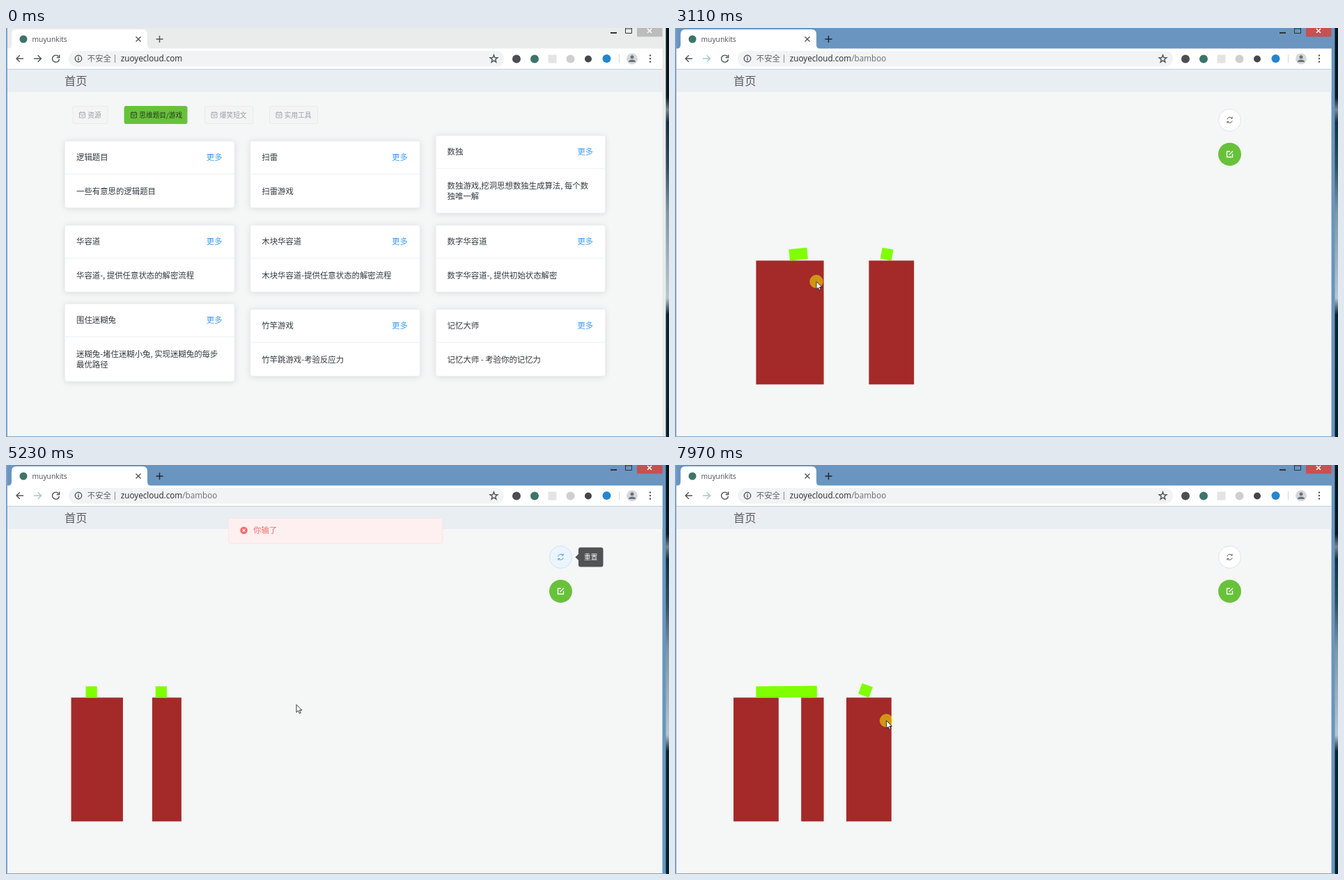
An HTML page for the animation above (8 s loop, 952x588 px).

```html
<!DOCTYPE html>
<html lang="zh">
<head>
<meta charset="utf-8">
<title>muyunkits</title>
<style>
html, body { margin: 0; width: 100%; height: 100%; overflow: hidden; background: #f5f5f5; }
svg { display: block; position: absolute; left: 0; top: 0; }
text { font-family: "Noto Sans CJK SC", "Noto Sans CJK", "Noto Sans", sans-serif; white-space: pre; }
.latin { font-family: "Open Sans", "Noto Sans", sans-serif; }
.card { fill: #fff; stroke: #ebeef5; stroke-width: .8; filter: drop-shadow(0 1.6px 4.5px rgba(0,0,0,.11)); }
.line { fill: none; stroke: #50555a; stroke-width: 1.4; }
</style>
</head>
<body>
<svg id="stage" width="952" height="588" viewBox="0 0 952 588">
  <defs>
    <linearGradient id="wall" x2="0" y2="1">
      <stop offset="0" stop-color="#04141d"/><stop offset=".17" stop-color="#0a1a24"/>
      <stop offset=".2" stop-color="#77858c"/><stop offset=".23" stop-color="#12303e"/>
      <stop offset=".34" stop-color="#2f4f60"/><stop offset=".45" stop-color="#7d97a5"/>
      <stop offset=".66" stop-color="#b6c6ce"/><stop offset=".7" stop-color="#0c2431"/>
      <stop offset="1" stop-color="#06202c"/>
    </linearGradient>
  </defs>
  <rect id="frame" width="948" height="588"/>
  <rect x="947.5" width="4.5" height="588" fill="url(#wall)"/>
  <rect id="leftEdge" width="2" height="588" fill="#7ba3c8"/>
  <rect x="2" y="30" width="940.5" height="557" fill="#f5f6f6"/>
  <rect y="587" width="948" height="1" fill="#7ba3c8"/>

  <g id="chrome">
    <path d="M2 30Q8 30 8 24V9Q8 2 15 2H196Q203 2 203 9V24Q203 30 209 30Z" fill="#fff"/>
    <rect x="2" y="29.5" width="940.5" height="29.5" fill="#fff"/>
    <rect x="2" y="58.8" width="940.5" height="1.2" fill="#c5d2de"/>
    <circle cx="25" cy="16" r="5.5" fill="#3d7568"/>
    <text class="latin" x="37.5" y="20" font-size="10.3" fill="#4b4f54">muyunkits</text>
    <path class="line" d="M186.5 12.5l7 7m0-7l-7 7"/>
    <path class="line" id="plus" d="M215.5 16h10m-5-5v10" stroke-width="1.7"/>
    <rect id="close" x="906" width="36.5" height="12.5"/>
    <path d="M921 1l6 6m0-6l-6 6" stroke="#fff" stroke-width="1.6"/>
    <path d="M868 7h9" stroke="#333" stroke-width="2"/>
    <path d="M889.5 0v7.5h9V0M889 1h10" stroke="#333" fill="none"/>
    <path class="line" d="M25 44H15m4.800-4.800L15 44l4.800 4.800"/>
    <path class="line" id="forward" d="M40 44h10.500m-4.800-4.800L50.500 44l-4.800 4.800"/>
    <path class="line" d="M75.500 41A5 5 0 1 0 76.500 45M76.700 38.500v4h-4"/>
    <rect x="90" y="33" width="625" height="22.500" rx="11.200" fill="#f1f3f4"/>
    <circle class="line" cx="104" cy="44" r="4.700" stroke-width="1.200"/>
    <path class="line" d="M104 43.300v3.400m0-5.400v1.100"/>
    <text x="116.800" y="48.200" font-size="11.400" fill="#5f6368">不安全</text>
    <path d="M156.500 38.500v11.500" stroke="#888c90"/>
    <text class="latin" x="164.800" y="48.200" font-size="11.700" fill="#26292d">zuoyecloud.com<tspan id="path" fill="#6b7075">/bamboo</tspan></text>
    <path class="line" id="star" stroke-width="1.100"/>
    <circle cx="733" cy="44.500" r="6" fill="#4b4e52"/>
    <circle cx="759" cy="44.500" r="6" fill="#3d7568"/>
    <rect x="778.500" y="38.500" width="12" height="12" fill="#e4e4e4"/>
    <circle cx="810.500" cy="44.500" r="6" fill="#cfcfcf"/>
    <circle cx="836" cy="44.500" r="5" fill="#44474a"/>
    <circle cx="862.500" cy="44" r="6" fill="#2585cf"/>
    <path d="M880.500 38v12" stroke="#d3d6d9"/>
    <circle cx="899" cy="44.300" r="8" fill="#d5d8dc"/>
    <circle cx="899" cy="41.800" r="2.500" fill="#6d7379"/>
    <path d="M894 49q0-3.500 5-3.500t5 3.500Z" fill="#6d7379"/>
    <path d="M925 39.500v.01M925 44v.01M925 48.500v.01" stroke="#50555a" stroke-width="2.400" stroke-linecap="round"/>
  </g>

  <rect x="2" y="60" width="940.500" height="32" fill="#e9eef3"/>
  <text x="84" y="82" font-size="16.200" fill="#5b5e64">首页</text>

  <g id="home"></g>

  <g id="game">
    <g id="platforms" fill="#a32a29"></g>
    <rect id="goal" width="16.200" height="16.200" fill="#7fff00"/>
    <rect id="nextGoal" width="16.200" height="16.200" fill="#7fff00"/>
    <rect id="player" width="16.200" fill="#7fff00"/>
    <circle id="reset" cx="796.500" cy="132.500" r="16" stroke-width=".9"/>
    <path id="resetIcon" fill="none" d="M792.800 131.300a4 4 0 0 1 7-1.600m.3-2v2.400h-2.400M800.200 133.300a4 4 0 0 1-7 1.600m-.3 2v-2.400h2.400"/>
    <circle id="comment" cx="796.500" cy="181.500" r="16.500"/>
    <path d="M797 177.500h-4.500v8h8v-4.500M795.500 182.500l5.500-5.500" fill="none" stroke="#fff" stroke-width="1.300"/>
    <g id="tip">
      <path d="M817.500 14l5-5v10Z"/><rect x="822" width="35.500" height="28" rx="3"/>
      <text id="tipText" x="830" y="17.600" font-size="9.700" style="fill:#fff"></text>
    </g>
    <g id="message">
      <rect x="319.500" y="76.500" width="307" height="36" rx="3" fill="#fef0f0" stroke="#fde2e2" stroke-width=".9"/>
      <circle cx="341.500" cy="94" r="5.300" fill="#f56c6c"/>
      <path d="M339.700 92.200l3.600 3.600m0-3.600l-3.600 3.600" stroke="#fff" stroke-width="1.100"/>
      <text x="355" y="98" font-size="11.400" fill="#f56c6c">你输了</text>
    </g>
  </g>

  <g id="pointer">
    <circle id="halo" r="9.700" fill="#ff0" fill-opacity=".5"/>
    <path id="arrow" d="M0 0V11L2.600 8.700L4.400 12.700L6.200 11.900L4.500 8H8Z" fill="#fff" stroke="#222" stroke-width=".9"/>
    <path id="hand" d="M-1.200 1Q0-.8 1.200 1V5L6 6.200Q7.500 6.800 7.200 9L6 14H0L-3.600 9.200Q-4 7.500-2.600 7.700L-1.200 9Z" fill="#fff" stroke="#222" stroke-width="1"/>
  </g>
</svg>

<script>
const LOOP = 8000, UNIT = 32.4, LEFT = 84, GROUND = 334.4, SIZE = 16.2;
const $ = id => document.getElementById(id);
const set = (id, attrs) => { for (const k in attrs) $(id).setAttribute(k, attrs[k]); };
const show = (id, on) => { $(id).style.display = on ? "" : "none"; };
const clamp = v => Math.max(0, Math.min(1, v));
const mix = (a, b, k) => a + (b - a) * k;
const span = (t, start, length) => clamp((t - start) / length);
const within = (t, a, b) => t >= a && t < b;

function add(parent, tag, attrs, text = "") {
  const el = document.createElementNS("http://www.w3.org/2000/svg", tag);
  for (const k in attrs) el.setAttribute(k, attrs[k]);
  el.textContent = text;
  return parent.appendChild(el);
}

// CSS "ease": cubic-bezier(.25, .1, .25, 1)
function ease(x) {
  if (x <= 0 || x >= 1) return clamp(x);
  const bez = (a, b, u) => 3 * a * u * (1 - u) ** 2 + 3 * b * u * u * (1 - u) + u ** 3;
  let lo = 0, hi = 1;
  for (let i = 0; i < 20; i++) {
    const mid = (lo + hi) / 2;
    if (bez(.25, .25, mid) < x) lo = mid; else hi = mid;
  }
  return bez(.1, 1, lo);
}

// Home page: filter buttons and cards
const home = $("home");
const filters = [[96, 50, "资源"], [170, 90, "思维题目/游戏"], [285.5, 69, "爆笑短文"], [378.5, 69, "实用工具"]];
filters.forEach(([x, width, label], i) => {
  const on = i === 1, ink = on ? "#253a1c" : "#9a9da3";
  add(home, "rect", { x, y: 112.5, width, height: 25, rx: 2, fill: on ? "#67c23a" : "#f4f4f5", stroke: on ? "#67c23a" : "#e9e9eb", "stroke-width": .9 });
  add(home, "path", { d: `M${x + 9.5} 121.500h8v7.500h-8Zm0 2.500h8M${x + 11.5} 120v2m4-2v2m-4 4.500h4`, fill: "none", stroke: ink, "stroke-width": .8 });
  add(home, "text", { x: x + 21.3, y: 128.6, "font-size": 9.7, fill: ink, "font-weight": on ? 500 : 400 }, label);
});

const cards = [
  [0, 162.5, "逻辑题目", "一些有意思的逻辑题目"],
  [1, 162.5, "扫雷", "扫雷游戏"],
  [2, 154.5, "数独", "数独游戏,挖洞思想数独生成算法, 每个数", "独唯一解"],
  [0, 283.5, "华容道", "华容道-, 提供任意状态的解密流程"],
  [1, 283.5, "木块华容道", "木块华容道-提供任意状态的解密流程"],
  [2, 283.5, "数字华容道", "数字华容道-, 提供初始状态解密"],
  [0, 396.5, "围住迷糊兔", "迷糊兔-堵住迷糊小兔, 实现迷糊兔的每步", "最优路径"],
  [1, 404.5, "竹竿游戏", "竹竿跳游戏-考验反应力"],
  [2, 404.5, "记忆大师", "记忆大师 - 考验你的记忆力"]
];
for (const [col, y, title, ...lines] of cards) {
  const x = 84.5 + col * 266.3;
  const write = (dx, dy, text, fill = "#36383c") => add(home, "text", { x: x + dx, y: y + dy, "font-size": 11.4, fill }, text);
  add(home, "rect", { class: "card", x, y, width: 243.5, height: lines.length > 1 ? 111.5 : 96, rx: 3 });
  add(home, "path", { d: `M${x} ${y + 47.5}h243.500`, stroke: "#ebeef5" });
  write(16.5, 27, title);
  write(203.3, 27, "更多", "#409eff");
  lines.forEach((line, i) => write(16.5, 76.3 + i * 15.6, line));
}

const corners = Array.from({ length: 10 }, (_, i) => {
  const a = i * Math.PI / 5, r = i % 2 ? 2.4 : 5.7;
  return `${700.5 + r * Math.sin(a)} ${44.5 - r * Math.cos(a)}`;
});
set("star", { d: `M${corners.join("L")}Z` });

const platforms = [0, 1, 2].map(() => add($("platforms"), "rect", { y: GROUND, height: 178 }));

// Platform edges in grid units: [left, right]
const before = [[1, 4], [6, 8]], after = [[0, 2], [3, 4], [5, 7]];

// Pointer stops: time, x, y
const stops = [
  [70, 759, 551], [700, 566, 430], [1000, 566, 430], [1410, 295.5, 328], [1800, 203, 364.5],
  [3480, 203, 364.5], [4050, 801, 178], [4400, 801, 178], [4650, 797, 130], [4880, 797, 130],
  [5230, 417, 344.5], [5850, 286.5, 372], [6800, 286.5, 372], [7600, 303.5, 367.5], [8000, 303.5, 367.5]
];

function pointerAt(t) {
  const i = Math.max(1, stops.findIndex(s => s[0] >= t));
  const [t0, x0, y0] = stops[i - 1], [t1, x1, y1] = stops[i];
  const k = span(t, t0, t1 - t0), s = k * k * (3 - 2 * k);
  return [mix(x0, x1, s), mix(y0, y1, s)];
}

// A block that tips over its lower right corner
function place(id, x, height, angle) {
  set(id, { x, y: GROUND - height, height, transform: `rotate(${angle} ${x + SIZE} ${GROUND})` });
}

function drawGame(t) {
  const RESET = 4815, again = t >= RESET;
  const move = ease(span(t, RESET, 1000));
  platforms.forEach((el, i) => {
    const [a, b] = before[i] || after[i], [c, d] = after[i];
    const l = LEFT + UNIT * mix(a, c, move), r = LEFT + UNIT * mix(b, d, move);
    el.setAttribute("x", l);
    el.setAttribute("width", r - l);
  });
  const landed = t >= 7900;
  platforms[2].style.display = landed ? "" : "none";
  show("nextGoal", landed);
  place("nextGoal", LEFT + UNIT * 5.5, SIZE, 20);
  place("goal", LEFT + UNIT * mix(6.5, 3, move), SIZE, again ? 0 : 10);

  const height = again ? mix(SIZE, 87.5, span(t, 5900, 525)) : mix(SIZE, 26, span(t, 1850, 70));
  const fall = ease(span(t, again ? 7070 : 2420, 1000));
  place("player", LEFT + UNIT * mix(2, .5, move), height, 90 * fall);

  const leaving = t > 6100;
  const slide = leaving ? 1 - ease(span(t, 6100, 300)) : ease(span(t, 3370, 400));
  const fade = leaving ? slide : ease(span(t, 3370, 300));
  set("message", { opacity: fade, transform: `translate(0 ${-37 * (1 - slide)})` });

  const resetOn = within(t, 4600, 5900);
  set("reset", { fill: resetOn ? "#ecf5ff" : "#fff", stroke: resetOn ? "#c6e2ff" : "#dcdfe6" });
  set("resetIcon", { stroke: resetOn ? "#409eff" : "#606266" });
  set("comment", { fill: within(t, 4020, 4520) ? "#85ce61" : "#67c23a" });

  const onReset = t >= 4600;
  $("tipText").textContent = onReset ? "重置" : "评论";
  const [tipIn, tipOut] = onReset ? [4620, 5180] : [4000, 4450];
  set("tip", {
    fill: "#303133", transform: `translate(0 ${onReset ? 118.5 : 168})`,
    opacity: Math.min(span(t, tipIn, 120), 1 - span(t, tipOut, onReset ? 300 : 140))
  });
}

function draw(t) {
  const active = t >= 930, playing = t >= 1010;
  set("frame", { fill: active ? "#6995c0" : "#eaebeb" });
  set("close", { fill: active ? "#c75050" : "#bcbcbc" });
  set("plus", { style: `stroke:${active ? "#20262c" : "#50555a"}` });
  set("forward", { style: `stroke:${playing ? "#a3c9c0" : "#50555a"}` });
  show("home", !playing);
  show("game", playing);
  show("path", playing);
  if (playing) drawGame(t);

  const [x, y] = pointerAt(t);
  const hand = within(t, 660, 1040) || within(t, 4010, 4900);
  show("pointer", t >= 70);
  set("pointer", { transform: `translate(${x} ${y})` });
  show("hand", hand);
  show("arrow", !hand);
  show("halo", within(t, 800, 960) || within(t, 1830, 3350) || within(t, 4770, 4880) || t >= 5900);
}

const began = performance.now();
function tick() {
  draw((performance.now() - began) % LOOP);
  requestAnimationFrame(tick);
}
tick();
</script>
</body>
</html>
```
